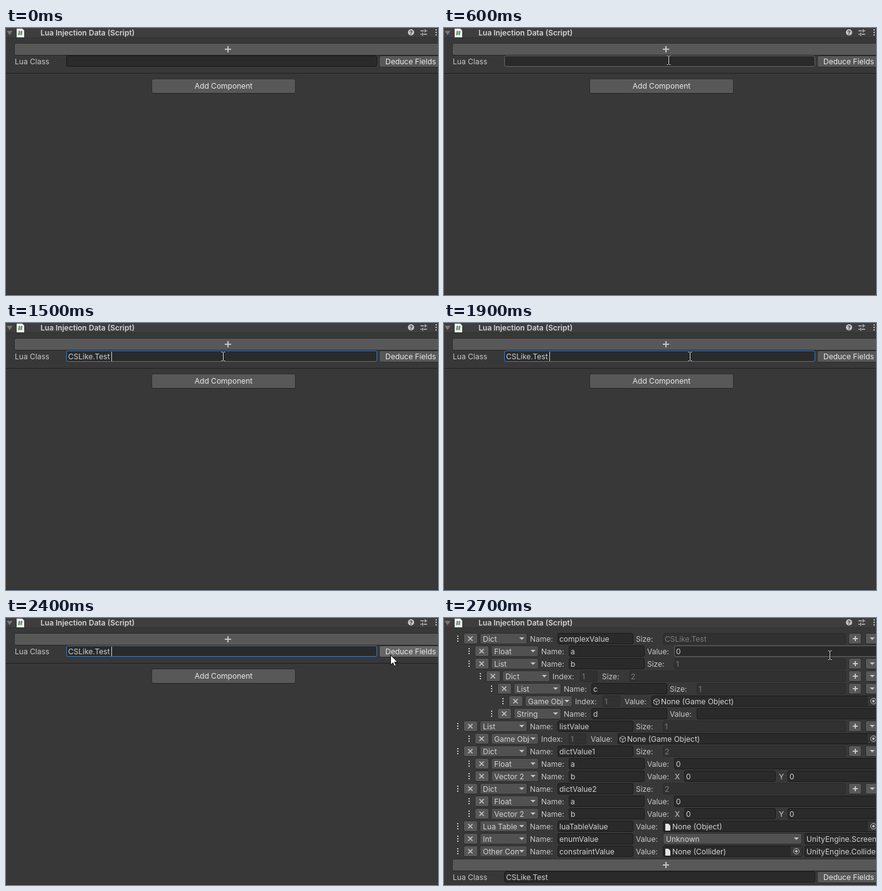
Write an HTML page that moves like this. It is 689x427 px and loops after 8 s.

```html
<!DOCTYPE html>
<html lang="en">
<head>
<meta charset="utf-8">
<title>Injection inspector</title>
<style>
html, body { margin: 0; width: 100%; height: 100%; overflow: hidden; background: #383838; }
svg { display: block; width: 689px; height: 427px; }
text { font: 12px Inter, Roboto, sans-serif; fill: #c8c8c8; white-space: pre; }
.bold { font-weight: 600; fill: #d4d4d4; }
.bright { fill: #eaeaea; }
.value { fill: #d2d2d2; }
.dim { fill: #7c7c7c; }
.field { fill: #2a2a2a; stroke: #1b1b1b; }
.off { fill: #313131; stroke: #2b2b2b; }
.hot { fill: #2a2a2a; stroke: #656565; }
.button { fill: #585858; stroke: #2d2d2d; }
.popup { fill: #515151; stroke: #2d2d2d; }
.icon { fill: #c4c4c4; }
.line { fill: none; stroke: #c4c4c4; }

.anim { animation: 8s step-end infinite; }
#before { animation-name: before; }
#after { animation-name: after; }
#input { animation-name: input; }
#deduce { animation-name: deduce; }
#caret { animation-name: caret; }
#typed { animation-name: typed; }
#cursor { animation-name: move; }
#arrow { animation-name: arrow; }
#beam { animation-name: beam; }
@keyframes before { 0% { opacity: 1 } 33.75%, 100% { opacity: 0 } }
@keyframes after { 0% { opacity: 0 } 33.75%, 100% { opacity: 1 } }
@keyframes input {
  0% { stroke: #1b1b1b } 3.75% { stroke: #656565 } 11.25%, 100% { stroke: #3a79bb }
}
@keyframes deduce {
  0% { fill: #585858 } 2.5% { fill: #676767 } 3.75% { fill: #585858 }
  27.5% { fill: #676767 } 31.25%, 100% { fill: #46607c }
}
@keyframes caret {
  0% { opacity: 0; transform: translateX(99px) }
  11.25% { opacity: 1; transform: translateX(99px) }
  18.75%, 100% { opacity: 1; transform: translateX(168px) }
}
@keyframes typed { 0% { opacity: 0 } 18.75%, 100% { opacity: 1 } }
@keyframes move {
  0% { transform: translate(-60px, -60px) }
  2.5% { transform: translate(640px, 44px) }
  3.75% { transform: translate(502px, 48px) }
  5% { transform: translate(438px, 45px) }
  6.25% { transform: translate(388px, 47px) }
  7.5% { transform: translate(358px, 51px) }
  8.75% { transform: translate(346px, 53px) }
  23.75% { transform: translate(392px, 53px) }
  25% { transform: translate(480px, 54px) }
  26.25% { transform: translate(572px, 56px) }
  27.5% { transform: translate(601px, 57px) }
  28.75% { transform: translate(609px, 58px) }
  30% { transform: translate(613px, 59px) }
  33.75%, 100% { transform: translate(615px, 59px) }
}
@keyframes arrow { 0% { opacity: 1 } 3.75% { opacity: 0 } 27.5% { opacity: 1 } 33.75%, 100% { opacity: 0 } }
@keyframes beam { 0% { opacity: 0 } 3.75% { opacity: 1 } 27.5% { opacity: 0 } 33.75%, 100% { opacity: 1 } }
</style>
</head>
<body>
<svg id="stage" viewBox="0 0 689 427"></svg>
<script>
const EDGE = 700; // boxes that run off the right side end here

const text = (x, y, s, cls = '', extra = '') => `<text x="${x}" y="${y}" class="${cls}" ${extra}>${s}</text>`;
const box = (x, y, right, cls, h = 18, extra = '') =>
  `<rect x="${x + .5}" y="${y + .5}" width="${right - x - 1}" height="${h - 1}" rx="2.5" class="${cls}" ${extra}/>`;
const bar = (x, y, w, h, fill) => `<rect x="${x}" y="${y}" width="${w}" height="${h}" fill="${fill}"/>`;
const plus = (x, y, r = 4) =>
  `<path d="M${x - r} ${y}h${2 * r}M${x} ${y - r}v${2 * r}" class="line" stroke-width="2"/>`;
const down = (x, y) => `<path d="M${x - 4} ${y - 2}h8l-4 4z" class="icon"/>`;
const dots = (x, y) => [-4, 0, 4].map(d => bar(x - 1, y + d - 1, 2, 2, '#c4c4c4')).join('');
const button = (x, y, right, h = 18, extra = '') =>
  box(x, y, right, 'button', h, extra) + bar(x + 2, y + h - 1, right - x - 4, 1, '#242424');

const entry = (x, y, right, s, cls = 'field') =>
  box(x, y, right, cls) + text(x + 3, y + 14, s, cls === 'off' ? 'dim' : 'value');

function popup(x, y, right, s) {
  const id = `clip${x}-${y}`;
  return box(x, y, right, 'popup') +
    `<clipPath id="${id}"><rect x="${x}" y="${y}" width="${right - x - 14}" height="18"/></clipPath>` +
    text(x + 5, y + 14, s, 'value', `clip-path="url(#${id})"`) + down(right - 9, y + 9);
}

const cube = (x, y) =>
  `<path d="M${x} ${y - 5}l4.5 2.5v5l-4.5 2.5l-4.5 -2.5v-5zM${x - 4.5} ${y - 2.5}l4.5 2.5l4.5 -2.5M${x} ${y}v5" class="line" stroke-width=".9"/>`;
const page = (x, y) => `<path d="M${x - 4} ${y - 5}h5l3 3v8h-8z" fill="#e4e4e4"/>`;

function objectField(x, y, right, s, icon, pick) {
  return box(x, y, right, 'field') + icon(x + 8, y + 10) + text(x + 15, y + 14, s, 'value') +
    bar(pick - 9, y + 1, 18, 16, '#373737') +
    `<circle cx="${pick}" cy="${y + 9}" r="4.5" class="line"/><circle cx="${pick}" cy="${y + 9}" r="2" class="icon"/>`;
}

// What follows the name or index: each takes (x of its label, y)
const size = (n) => (x, y) =>
  text(x, y + 14, 'Size:') + entry(x + 43, y, 641, n, 'off') +
  button(645, y, 666) + plus(656, y + 9) + button(672, y, EDGE) + down(683, y + 9);
const value = (draw) => (x, y) => text(x, y + 14, 'Value:') + draw(x + 43, y);
const plain = (s, cls) => value((x, y) => entry(x, y, EDGE, s, cls));
const object = (s, icon) => value((x, y) => objectField(x, y, EDGE, s, icon, 685));
const vector = value((x, y) =>
  text(x + 1, y + 14, 'X') + entry(x + 16, y, x + 162, '0') +
  text(534, y + 14, 'Y') + entry(548, y, EDGE, '0'));
const choice = value((x, y) => popup(x, y, 571, 'Unknown') + entry(575, y, EDGE, 'UnityEngine.Screen'));
const collider = value((x, y) =>
  objectField(x, y, 572, 'None (Collider)', page, 562) + entry(575, y, EDGE, 'UnityEngine.Collider'));

// depth, type, name (a number is a list index), tail
const rows = [
  [0, 'Dict', 'complexValue', size('CSLike.Test')],
  [1, 'Float', 'a', plain('0', 'hot')],
  [1, 'List', 'b', size(1)],
  [2, 'Dict', 1, size(2)],
  [3, 'List', 'c', size(1)],
  [4, 'Game Object', 1, object('None (Game Object)', cube)],
  [3, 'String', 'd', plain('')],
  [0, 'List', 'listValue', size(1)],
  [1, 'Game Object', 1, object('None (Game Object)', cube)],
  [0, 'Dict', 'dictValue1', size(2)],
  [1, 'Float', 'a', plain('0')],
  [1, 'Vector 2', 'b', vector],
  [0, 'Dict', 'dictValue2', size(2)],
  [1, 'Float', 'a', plain('0')],
  [1, 'Vector 2', 'b', vector],
  [0, 'Lua Table', 'luaTableValue', object('None (Object)', page)],
  [0, 'Int', 'enumValue', choice],
  [0, 'Other Constraint', 'constraintValue', collider],
];

function row([depth, type, name, tail], i) {
  const y = 24 + 20 * i, s = 18 * depth, indexed = typeof name === 'number';
  const cross = `<path d="M${s + 38.5} ${y + 5.5}l7 7m0 -7l-7 7" class="line" stroke-width="1.6"/>`;
  return dots(22 + s, y + 9) + button(31 + s, y, 54 + s) + cross + popup(57 + s, y, 133 + s, type) +
    text(137 + s, y + 14, indexed ? 'Index:' : 'Name:') +
    entry(181 + s, y, (indexed ? 209 : 302) + s, name, indexed ? 'off' : 'field') +
    tail((indexed ? 216 : 306) + s, y);
}

// Add button, class field and deduce button
const footer = (y, live) =>
  button(13, y, EDGE, 20) + plus(354, y + 10, 5) +
  text(14, y + 34, 'Lua Class') +
  box(96, y + 20, 592, 'field anim', 18, live ? 'id="input"' : 'style="animation:none"') +
  text(99, y + 34, 'CSLike.Test', 'value anim', live ? 'id="typed"' : '') +
  (live ? `<rect id="caret" class="anim" y="46" width="1" height="15" fill="#d2d2d2"/>` : '') +
  box(595, y + 20, EDGE, 'button anim', 19, live ? 'id="deduce"' : '') +
  text(605, y + 34, 'Deduce Fields', 'bright');

const header =
  bar(0, 0, 689, 15, '#3e3e3e') + bar(0, 15, 689, 1, '#303030') +
  '<path d="M1 4.500h9.500l-4.750 7z" fill="#777"/>' +
  '<path d="M17 1h9l3 3v11h-12z" fill="#f0f0f0"/>' +
  '<path d="M21.500 4.500l-1 7m4.500 -7l-1 7m-4.500 -5h7m-7.500 3h7" fill="none" stroke="#2f7d3b" stroke-width="1.200"/>' +
  text(55, 12, 'Lua Injection Data (Script)', 'bold') +
  '<circle cx="646" cy="7" r="5" class="icon"/>' +
  text(646, 10.5, '?', '', 'text-anchor="middle" style="font-size:9px;font-weight:700;fill:#3e3e3e"') +
  '<path d="M661 4.500h5.500m3 0h2M661 10h2m3 0h5.500M668.500 2v5M664.500 7.500v5" class="line" stroke-width="1.300"/>' +
  dots(686, 7);

const before = footer(24, true) +
  bar(0, 72, 689, 1, '#202020') + bar(688, 73, 1, 354, '#303030') +
  button(232, 81, 462, 24) + text(347, 97, 'Add Component', 'bright', 'text-anchor="middle"');

const cursor =
  '<path id="arrow" class="anim" d="M.5 .5v15.500l3.600 -3.400l2.600 5.600l2.500 -1.100l-2.500 -5.500h5z" fill="#fff" stroke="#000" stroke-width=".9"/>' +
  '<g id="beam" class="anim" fill="none"><path d="M-2.500 -6.500h2l1 1l1 -1h2M.5 -6v13M-2.500 7.500h2l1 -1l1 1h2" stroke="#000" stroke-width="2.600" opacity=".45"/>' +
  '<path d="M-2.500 -6.500h2l1 1l1 -1h2M.5 -6v13M-2.500 7.500h2l1 -1l1 1h2" stroke="#e8e8e8"/></g>';

document.getElementById('stage').innerHTML =
  bar(0, 0, 689, 427, '#383838') + header +
  `<g id="before" class="anim">${before}</g>` +
  `<g id="after" class="anim">${rows.map(row).join('')}${footer(385, false)}</g>` +
  bar(0, 426, 689, 1, '#303030') +
  `<g id="cursor" class="anim">${cursor}</g>`;
</script>
</body>
</html>
```
